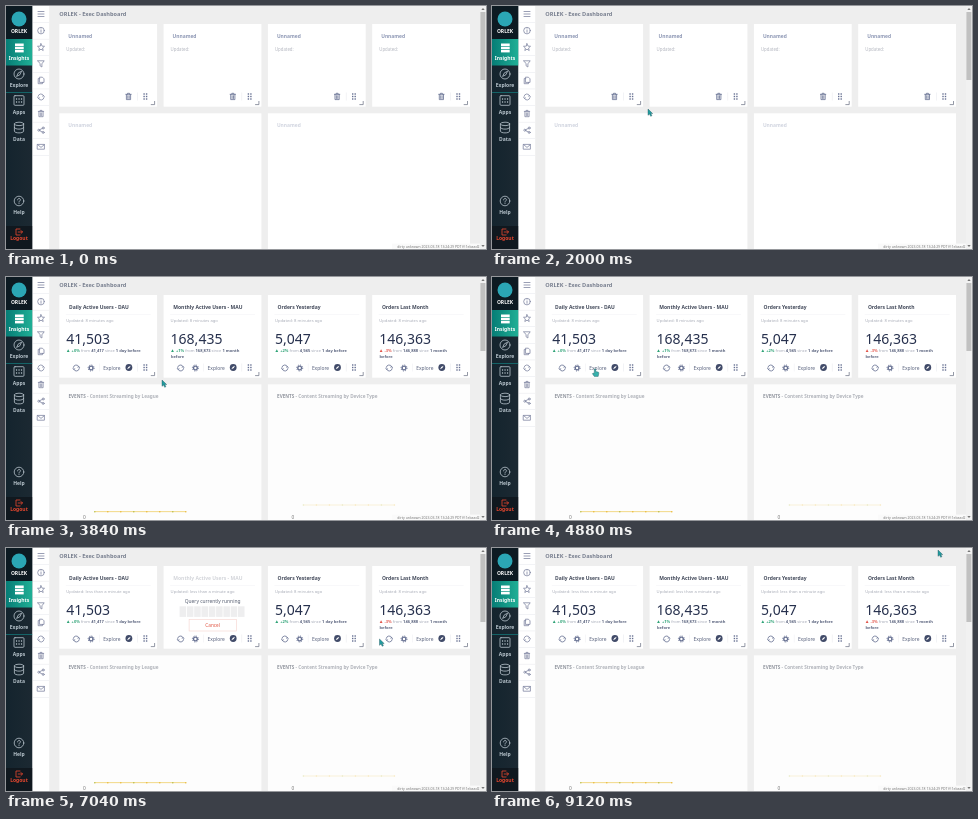
An HTML page for the animation above (9200 ms loop, 480 px wide and 243 px high).

```html
<!DOCTYPE html>
<html lang="en">
<head>
<meta charset="utf-8">
<title>Exec Dashboard</title>
<style>
html, body { margin: 0; width: 100%; height: 100%; overflow: hidden; background: #eee; }
svg { display: block; width: 100vw; height: 100vh; font-family: "Noto Sans", "Open Sans", sans-serif; }
.line { fill: none; stroke: currentColor; stroke-width: .8; stroke-linecap: round; stroke-linejoin: round; }
</style>
</head>
<body>
<svg id="stage" viewBox="0 0 480 243">
  <defs>
    <linearGradient id="side"><stop stop-color="#14242e"/><stop offset="1" stop-color="#1c2932"/></linearGradient>
    <linearGradient id="active"><stop stop-color="#067d76"/><stop offset="1" stop-color="#20b096"/></linearGradient>
  </defs>
  <rect width="480" height="243" fill="#eee"/>
  <g id="menu"></g>
  <g id="tools"></g>
  <g id="cards"></g>
  <g id="charts"></g>
  <g id="frame"></g>
  <g id="cursor"></g>
</svg>
<script>
const LOOP = 9200, STEP = 80, LOADED = 2960, SHOW = 1840;
const CARD_X = [53.3, 157.6, 261.9, 366.2];
const METRICS = [
  { title: 'Daily Active Users - DAU', value: '41,503', pct: '+0%', from: '41,417', span: ['1 day before'], run: [5280, 6480] },
  { title: 'Monthly Active Users - MAU', value: '168,435', pct: '+1%', from: '168,873', span: ['1 month', 'before'], run: [6160, 7280] },
  { title: 'Orders Yesterday', value: '5,047', pct: '+2%', from: '4,945', span: ['1 day before'], run: [7120, 8000] },
  { title: 'Orders Last Month', value: '146,363', pct: '-3%', from: '146,888', span: ['1 month', 'before'], run: [7440, 8560] }
];
// time, x, y of the pointer tip
const PATH = [
  [SHOW, 156, 103], [4160, 156, 103], [4720, 103, 92], [4960, 103, 92], [5200, 70, 90], [5360, 70, 90],
  [5840, 180, 95], [6000, 174, 90], [6160, 174, 90], [6480, 279, 90], [6640, 279, 90],
  [7040, 373.5, 91], [7200, 383, 90], [7440, 383, 90], [8320, 446, 2], [LOOP, 446, 2]
];

const $ = id => document.getElementById(id);
const text = (x, y, size, fill, s, extra = '') =>
  `<text x="${x}" y="${y}" font-size="${size}" fill="${fill}" ${extra}>${s}</text>`;
const rect = (x, y, w, h, fill, extra = '') =>
  `<rect x="${x}" y="${y}" width="${w}" height="${h}" fill="${fill}" ${extra}/>`;
const BOLD = 'font-weight="600"', MID = 'text-anchor="middle"';

const ICONS = {
  menu: '<path d="M-3-2.5H3M-3 0H3M-3 2.5H3"/>',
  info: '<circle r="3.3"/><path d="M0-.4V1.7M0-1.8V-1.7"/>',
  star: '<path d="M0-3.5L1-1.1 3.5-.9 1.6.8 2.2 3.3 0 2-2.2 3.3-1.6.8-3.5-.9-1-1.1Z"/>',
  funnel: '<path d="M-3.2-3H3.2L.9 0V3.2L-.9 2V0Z"/>',
  copy: '<path d="M-1.2-3.2H1.4L3-1.6V2H-1.2ZM-1.2-1.8H-2.8V3.3H1.5V2"/>',
  refresh: '<path d="M-3-.6A3 3 0 0 1 2.6-1.4M3 .6A3 3 0 0 1-2.6 1.4M3.3-.4L2.7-1.3 1.5-.9M-3.3.4L-2.7 1.3-1.5.9"/>',
  trash: '<path d="M-2.7-2.2H2.7M-1-2.3V-3.2H1V-2.3M-2.1-2V3.1H2.1V-2M-.7-.8V2M.7-.8V2"/>',
  share: '<circle cx="-2.2" r="1"/><circle cx="2.2" cy="-2.2" r="1"/><circle cx="2.2" cy="2.2" r="1"/><path d="M-1.3-.5L1.3-1.8M-1.3.5L1.3 1.8"/>',
  mail: '<path d="M-3.4-2.4H3.4V2.4H-3.4ZM-3.4-2.2L0 .6 3.4-2.2"/>',
  gear: '<circle r="1.9" stroke-width="1.4"/><circle r="3" stroke-width="1" stroke-dasharray="1.1 1.256" stroke-linecap="butt"/>',
  compass: '<circle r="5"/><path d="M2.4-2.4L.8.8-2.4 2.4-.8-.8Z"/>',
  apps: '<rect x="-5" y="-4.8" width="10" height="9.6" rx="1"/><path d="M-2.5-1.5H-2.4M0-1.5H.1M2.5-1.5H2.6M-2.5 1.5H-2.4M0 1.5H.1M2.5 1.5H2.6" stroke-width="1.3"/>',
  data: '<ellipse cy="-3.6" rx="4.6" ry="1.7"/><path d="M-4.6-3.6V3.6C-4.6 6 4.6 6 4.6 3.6V-3.6M-4.6 0C-4.6 2.3 4.6 2.3 4.6 0"/>',
  help: '<circle r="4.8"/><path d="M-1.4-1.1C-1.4-3.2 1.6-3 1.4-1.1 1.2-.1 0-.1 0 1.1M0 2.5V2.6"/>',
  logout: '<path d="M1-3H-3V3H1M-.8 0H3.4M2-1.5L3.5 0 2 1.5"/>'
};
const icon = (name, x, y, color) =>
  `<g class="line" color="${color}" transform="translate(${x} ${y})">${ICONS[name]}</g>`;

function menu() {
  const item = (name, label, iy, ty, color = '#b9c5cd') =>
    icon(name, 13, iy, color) + text(13, ty, 5, color, label, MID + ' ' + BOLD);
  return rect(0, 0, 26.5, 243, 'url(#side)') + rect(0, 0, 26.5, 33, '#0d1a22') +
    rect(0, 220, 26.5, 23, '#10181f') +
    '<circle cx="13" cy="13" r="7.5" fill="#2ba6b5"/>' +
    text(13, 27.3, 5, '#fff', 'ORLEK', MID + ' font-weight="700"') +
    rect(0, 33, 26.5, 26.5, 'url(#active)') +
    [37.5, 40.7, 43.9].map(y => rect(9, y, 8.7, 2.5, '#fff')).join('') +
    text(13, 54, 5, '#fff', 'Insights', MID + ' font-weight="700"') +
    item('compass', 'Explore', 68, 81) + rect(0, 86.3, 26.5, .7, '#137f80') +
    item('apps', 'Apps', 94.5, 108) + item('data', 'Data', 121.5, 135) +
    item('help', 'Help', 195, 208.3) + item('logout', 'Logout', 226, 233.5, '#e8472f');
}

function tools() {
  const names = ['menu', 'info', 'star', 'funnel', 'copy', 'refresh', 'trash', 'share', 'mail'];
  return rect(26.5, 0, 16.7, 243, '#fff') + names.map((n, i) =>
    icon(n, 35, 8 + i * 16.6, '#8087a3') + rect(27, 16.3 + i * 16.6, 16, .5, '#e5e6ec')).join('');
}

function frame() {
  return text(53.3, 9.6, 5.6, '#777e8e', 'ORLEK - Exec Dashboard', BOLD) +
    rect(474, 0, 6, 243, '#f1f1f1') + rect(474.4, 6, 5, 68, '#c1c1c1') +
    '<path d="M475.3 4L477 2l1.7 2Z" fill="#777"/><path d="M475.3 239L477 241l1.7-2Z" fill="#777"/>' +
    rect(386, 237.6, 88, 5.4, '#fafafa') +
    text(473.5, 241.7, 3.45, '#777', 'dirty unknown 2023-03-18 13:24:29 PDT ff:1ebaad2', 'text-anchor="end"');
}

function dots(x, y) {
  let s = '';
  for (let i = 0; i < 6; i++) s += rect(x - 1.9 + (i % 2) * 2.5, y - 3.2 + (i >> 1) * 2.5, 1.4, 1.4, '#667092');
  return s;
}

function trend(m) {
  const color = m.pct[0] === '-' ? '#e2574c' : '#2fa377';
  const second = m.span[1] ? text(7.3, 81.3, 4.05, '#59627d', m.span[1], BOLD) : '';
  return `<path d="M7.5 75L8.9 72.3 10.3 75Z" fill="${color}"/>` +
    `<text x="12.3" y="75.3" font-size="4.05" fill="#a3a8b6"><tspan fill="${color}" ${BOLD}>${m.pct}</tspan> from ` +
    `<tspan fill="#59627d" ${BOLD}>${m.from}</tspan> since <tspan fill="#59627d" ${BOLD}>${m.span[0]}</tspan></text>` + second;
}

function progress(mark) {
  let s = text(49, 54.5, 4.9, '#555d70', 'Query currently running', MID);
  for (let i = 0; i < 9; i++) s += rect(16 + i * 7.3, 58.3, 6.5, 10.6, '#eeeeef');
  if (mark) s += rect(48, 65.5, 5, 1, '#43b590');
  return s + rect(25.5, 71.5, 47.5, 11.5, '#fff', 'stroke="#f6d3cd" stroke-width=".6"') +
    text(49, 79, 4.7, '#e0513f', 'Cancel', MID);
}

function card(m, state) {
  const ready = state !== 'empty', running = state.startsWith('run');
  let s = rect(0, 18, 97.8, 82.7, '#fff') +
    '<path d="M91.5 98.6H95.3V95" fill="none" stroke="#666d80" stroke-width=".7"/>' +
    dots(86, 90.5);
  if (!ready) {
    return s + text(9, 32, 4.9, '#8d97b4', 'Unnamed', BOLD) + text(7, 45, 4.35, '#b4b7c0', 'Updated:') +
      icon('trash', 69.2, 90.5, '#667092') + rect(78, 86.5, .5, 8, '#e5e6ec');
  }
  const ago = state === 'old' ? '8 minutes' : 'less than a minute';
  s += text(9.7, 32, 5, running ? '#d3d5da' : '#414859', m.title, BOLD) +
    rect(6.5, 37.5, 85, .4, '#eeeef1') + text(7, 45, 4.2, '#a9adb8', `Updated: ${ago} ago`);
  s += running ? progress(state === 'run1')
    : text(7, 67, 14, '#26304d', m.value, 'font-weight="500"') + trend(m);
  return s + icon('refresh', 17, 91, '#667092') + icon('gear', 31.8, 91, '#667092') +
    text(44, 92.6, 4.9, '#59627d', 'Explore') +
    '<circle cx="69.6" cy="90.5" r="3.4" fill="#414b69"/><path d="M71.4 88.7L70.2 91.1 67.8 92.3 69 89.9Z" fill="#fff"/>' +
    rect(40, 86.5, .4, 8, '#e8e9ee') + rect(78, 86.5, .5, 8, '#e5e6ec');
}

function chart(i, ready) {
  const x = CARD_X[i * 2], y = i ? 228 : 234.7;
  let s = rect(x, 107.3, 202.1, 136, ready ? '#fdfdfd' : '#fff');
  if (!ready) return s + text(x + 9, 121, 4.9, '#d0d4df', 'Unnamed', BOLD);
  s += text(x + 9.2, 121, 4.65, '#b0b3ba',
    `<tspan fill="#92969f">EVENTS</tspan> - Content Streaming by ${i ? 'Device Type' : 'League'}`, BOLD) +
    text(x + 25, 242.3, 4.8, '#777', '0', MID);
  let pts = '';
  for (let k = 0; k < 8; k++) pts += `<circle cx="${x + 35.5 + k * 13}" cy="${y}" r=".8" fill="${k % 3 ? '#e9b93c' : '#b6bd4a'}"/>`;
  return s + `<g opacity="${i ? .3 : 1}">${rect(x + 35.5, y - .4, 91, .8, '#efd06a')}${pts}</g>`;
}

function place(t) {
  const i = Math.max(1, PATH.findIndex(p => p[0] > t));
  const [a, b] = [PATH[i - 1], PATH[i]];
  const u = (t - a[0]) / (b[0] - a[0]), e = u * u * (3 - 2 * u);
  return [a[1] + (b[1] - a[1]) * e, a[2] + (b[2] - a[2]) * e];
}

const ARROW = '<path d="M0 0V6.3L1.5 5 2.7 7.3 3.9 6.7 2.8 4.6H4.7Z" fill="#219c9f" stroke="#28545f" stroke-width=".4"/>';
const HAND = '<path d="M-.7 0Q0-.7.7 0V2.5L3.2 3.1Q4 3.4 3.8 4.4L3.2 7.4H-.7L-2.6 4.7Q-2.1 3.6-.7 4.5Z" fill="#36b3ad" stroke="#28545f" stroke-width=".4"/>';
const overButton = (x, y) => y > 86 && y < 95 && CARD_X.some(c => {
  const d = x - c;
  return (d > 12 && d < 21.5) || (d > 28 && d < 36) || (d > 43 && d < 74);
});

const cache = {};
function put(id, html) {
  if (cache[id] === html) return;
  cache[id] = html;
  $(id).innerHTML = html;
}

function stateAt(m, t) {
  const [start, end] = m.run;
  if (t < LOADED) return 'empty';
  if (t < start) return 'old';
  if (t >= end) return 'fresh';
  return t - start < 640 ? 'run1' : 'run2';
}

function render(t) {
  const ready = t >= LOADED;
  put('cards', METRICS.map((m, i) =>
    `<g transform="translate(${CARD_X[i]} 0)">${card(m, stateAt(m, t))}</g>`).join(''));
  put('charts', chart(0, ready) + chart(1, ready));
  if (t < SHOW) return put('cursor', '');
  const [x, y] = place(t);
  put('cursor', `<g transform="translate(${x} ${y})">${ready && overButton(x, y) ? HAND : ARROW}</g>`);
}

put('menu', menu());
put('tools', tools());
put('frame', frame());

const begin = performance.now();
function tick() {
  const t = (performance.now() - begin) % LOOP;
  render(Math.floor(t / STEP) * STEP);
  requestAnimationFrame(tick);
}
tick();
</script>
</body>
</html>
```
